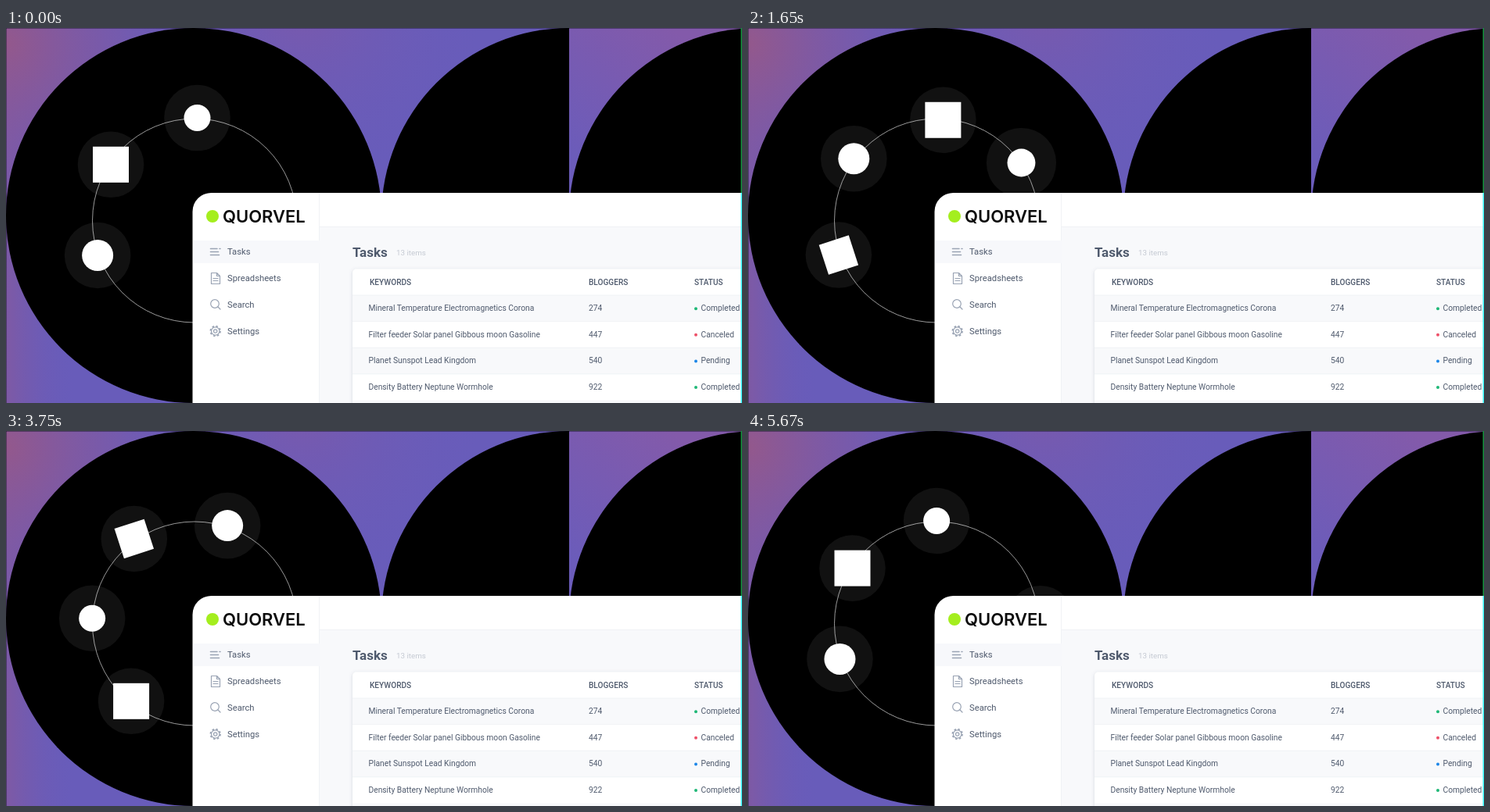
Write an HTML page that moves like this. It is 941x480 px and loops after 5.7 s.

```html
<!DOCTYPE html>
<html lang="en">
<head>
<meta charset="utf-8">
<title>Task dashboard</title>
<style>
  @property --a { syntax: "<angle>"; inherits: false; initial-value: 0deg; }
  @property --s { syntax: "<number>"; inherits: false; initial-value: 1; }

  html, body { margin: 0; width: 100%; height: 100%; overflow: hidden; background: #000; }
  svg { display: block; width: 941px; height: 480px; }
  text { font-family: Roboto, Arial, sans-serif; fill: #4f5a6d; }

  .badge {
    --r: -131px;
    transform: rotate(var(--a)) translateY(var(--r)) rotate(calc(-1 * var(--a))) scale(var(--s));
    transform-origin: 0 0;
    animation: 5700ms linear infinite;
  }
  .badge > circle:first-child { fill: #fff; fill-opacity: .067; }
  .mark { fill: #fff; }
  #note { animation-name: note; }
  #photo { --r: -128.5px; animation-name: photo; }
  #bird { --r: -131.8px; animation-name: bird; }
  #video { --r: -132.8px; animation-name: video; }

  /* Badges drift along the open arc and hurry past behind the panel. */
  @keyframes note {
    0% { --a: 1.5deg; --s: 1; }
    19.47% { --a: 32deg; --s: 1.06; }
    29.8% { --a: 58deg; }
    32.1% { --a: 180deg; }
    38.42% { --a: 203.4deg; --s: 1.05; }
    54.74% { --a: 225.6deg; --s: 1; }
    65.79% { --a: 272.7deg; }
    81.58% { --a: 310.7deg; }
    99.47% { --a: 360deg; }
    100% { --a: 361.5deg; --s: 1; }
  }
  @keyframes photo {
    0% { --a: -56.4deg; }
    19.47% { --a: -15deg; }
    38.42% { --a: 22.4deg; }
    51.75% { --a: 62deg; }
    54.74% { --a: 130deg; }
    56.5% { --a: 188deg; }
    65.79% { --a: 219deg; }
    81.58% { --a: 245.6deg; }
    99.47% { --a: 303.2deg; }
    100% { --a: 303.6deg; }
  }
  @keyframes bird {
    0% { --a: -110deg; }
    19.47% { --a: -71.8deg; }
    38.42% { --a: -34.9deg; }
    54.74% { --a: -1.7deg; }
    65.79% { --a: 18.6deg; }
    73.7% { --a: 43deg; }
    79% { --a: 70deg; }
    81.4% { --a: 110deg; }
    83.7% { --a: 190deg; }
    99.47% { --a: 249.6deg; }
    100% { --a: 250deg; }
  }
  @keyframes video {
    0% { --a: -210deg; }
    3.5% { --a: -180deg; }
    19.47% { --a: -131.9deg; }
    38.42% { --a: -87.4deg; }
    54.74% { --a: -56.3deg; }
    65.79% { --a: -35.6deg; }
    81.58% { --a: 8.7deg; }
    99.47% { --a: 87.4deg; }
    99.6% { --a: 88deg; }
    100% { --a: 150deg; }
  }

  .menu text { font-size: 11.25px; }
  .icons { fill: none; stroke: #9aa4b4; stroke-width: 1.2; stroke-linecap: round; stroke-linejoin: round; }
  .head text { font-size: 10.1px; font-weight: 500; }
  #rows text { font-size: 10.25px; }
</style>
</head>
<body>
<svg viewBox="0 0 941 480">
  <defs>
    <radialGradient id="rose" gradientUnits="userSpaceOnUse" cx="0" cy="20" r="300">
      <stop offset="0" stop-color="#93588c"/>
      <stop offset=".4" stop-color="#8059a2" stop-opacity=".7"/>
      <stop offset="1" stop-color="#6a5cba" stop-opacity="0"/>
    </radialGradient>
    <linearGradient id="side">
      <stop offset="0" stop-color="#84599f" stop-opacity=".8"/>
      <stop offset="1" stop-color="#685cba" stop-opacity="0"/>
    </linearGradient>
    <radialGradient id="haze" gradientUnits="userSpaceOnUse" cx="380" cy="-30" r="240">
      <stop offset="0" stop-color="#7a59ac"/>
      <stop offset="1" stop-color="#685cba" stop-opacity="0"/>
    </radialGradient>
    <linearGradient id="tile" gradientUnits="userSpaceOnUse" x1="850" y1="0" x2="735" y2="170">
      <stop offset="0" stop-color="#835aaa"/>
      <stop offset="1" stop-color="#6b5cba"/>
    </linearGradient>
    <filter id="soft" x="-5%" y="-5%" width="110%" height="110%">
      <feDropShadow dx="0" dy="1" stdDeviation="2" flood-color="#5a6b85" flood-opacity=".25"/>
    </filter>
  </defs>

  <rect width="941" height="480" fill="#685cba"/>
  <rect width="90" height="480" fill="url(#side)"/>
  <rect width="480" height="480" fill="url(#rose)"/>
  <rect width="720" height="300" fill="url(#haze)"/>
  <rect x="720" width="221" height="240" fill="url(#tile)"/>
  <path d="M0 480V0H941" fill="none" stroke="#1c1730"/>
  <circle cx="240" cy="240" r="240"/>
  <path d="M480 240A240 240 0 0 1 720 0V240Z"/>
  <circle cx="960" cy="240" r="240"/>

  <circle cx="241" cy="246.5" r="130.5" fill="none" stroke="#fff" stroke-width=".6"/>
  <g transform="translate(241 246)">
    <g class="badge" id="video"><circle r="42.3"/><rect class="mark" x="-20" y="-20" width="40" height="40" transform="rotate(-18)"/></g>
    <g class="badge" id="bird"><circle r="42.3"/><circle class="mark" r="20"/></g>
    <g class="badge" id="photo"><circle r="42.3"/><rect class="mark" x="-23" y="-23" width="46" height="46"/></g>
    <g class="badge" id="note"><circle r="42.3"/><circle class="mark" r="17"/></g>
  </g>

  <path d="M238.5 480V235A24 24 0 0 1 262.5 211H941V480Z" fill="#fff"/>
  <rect x="401" y="254" width="540" height="226" fill="#f8f9fb"/>
  <path d="M400.5 211V480M401 254.5H941" stroke="#f0f2f5"/>
  <rect x="239" y="272" width="162" height="29" fill="#f7f8fb"/>

  <circle cx="264" cy="241" r="8" fill="#a4ee1e"/>
  <text x="277" y="249" style="font:600 22px Inter,sans-serif;fill:#0c0c0c">QUORVEL</text>

  <g class="icons">
    <path d="M261.5 282.5H270M273 282.5H274M261.5 286.5H271.5M261.5 290.5H272.5" stroke-width="1.6"/>
    <path d="M269.5 313.5H262.5V327.5H273.5V317.5ZM269.5 313.5V317.5H273.5M265 320.5H271M265 323.5H271"/>
    <circle cx="267" cy="353" r="5.3"/>
    <path d="M271 357L274 360"/>
    <circle cx="267.7" cy="388" r="2.2"/>
    <circle cx="267.7" cy="388" r="5.2"/>
    <circle cx="267.7" cy="388" r="6.3" stroke-width="1.8" stroke-linecap="butt" stroke-dasharray="2.4 2.548"/>
  </g>
  <g class="menu">
    <text x="283" y="290">Tasks</text>
    <text x="283" y="324">Spreadsheets</text>
    <text x="283" y="358">Search</text>
    <text x="283" y="392">Settings</text>
  </g>

  <text x="443" y="293" font-size="17" font-weight="700">Tasks</text>
  <text x="499" y="290.5" font-size="9.8" style="fill:#c5cad3">13 items</text>
  <rect x="443" y="308.5" width="520" height="190" rx="5" fill="#fff" filter="url(#soft)"/>
  <g class="head">
    <text x="465" y="328.5">KEYWORDS</text>
    <text x="745" y="328.5">BLOGGERS</text>
    <text x="880" y="328.5">STATUS</text>
  </g>
  <g id="rows"></g>

  <rect x="939.5" width="1.5" height="211" fill="#17933f"/>
  <rect x="939.5" y="211" width="1.5" height="269" fill="#35f4f6"/>
</svg>
<script>
  const tint = { Completed: "#1fb877", Canceled: "#ee5068", Pending: "#1e87e8" };
  const tasks = [
    ["Mineral Temperature Electromagnetics Corona", 274, "Completed"],
    ["Filter feeder Solar panel Gibbous moon Gasoline", 447, "Canceled"],
    ["Planet Sunspot Lead Kingdom", 540, "Pending"],
    ["Density Battery Neptune Wormhole", 922, "Completed"]
  ];
  const row = ([words, count, state], i) => {
    const top = 342 + i * 33.6, base = top + 20;
    return `<rect x="443" y="${top}" width="498" height="33.6" fill="${i % 2 ? "#fff" : "#f8f9fb"}"/>
      <path d="M443 ${top}H941" stroke="#eef0f4" stroke-width=".8"/>
      <text x="463.5" y="${base}">${words}</text>
      <text x="745" y="${base}">${count}</text>
      <circle cx="882" cy="${base - 2.8}" r="2" fill="${tint[state]}"/>
      <text x="888.5" y="${base}">${state}</text>`;
  };
  document.getElementById("rows").innerHTML = tasks.map(row).join("") +
    '<rect x="443" y="476.4" width="498" height="4" fill="#f8f9fb"/>';
</script>
</body>
</html>
```
